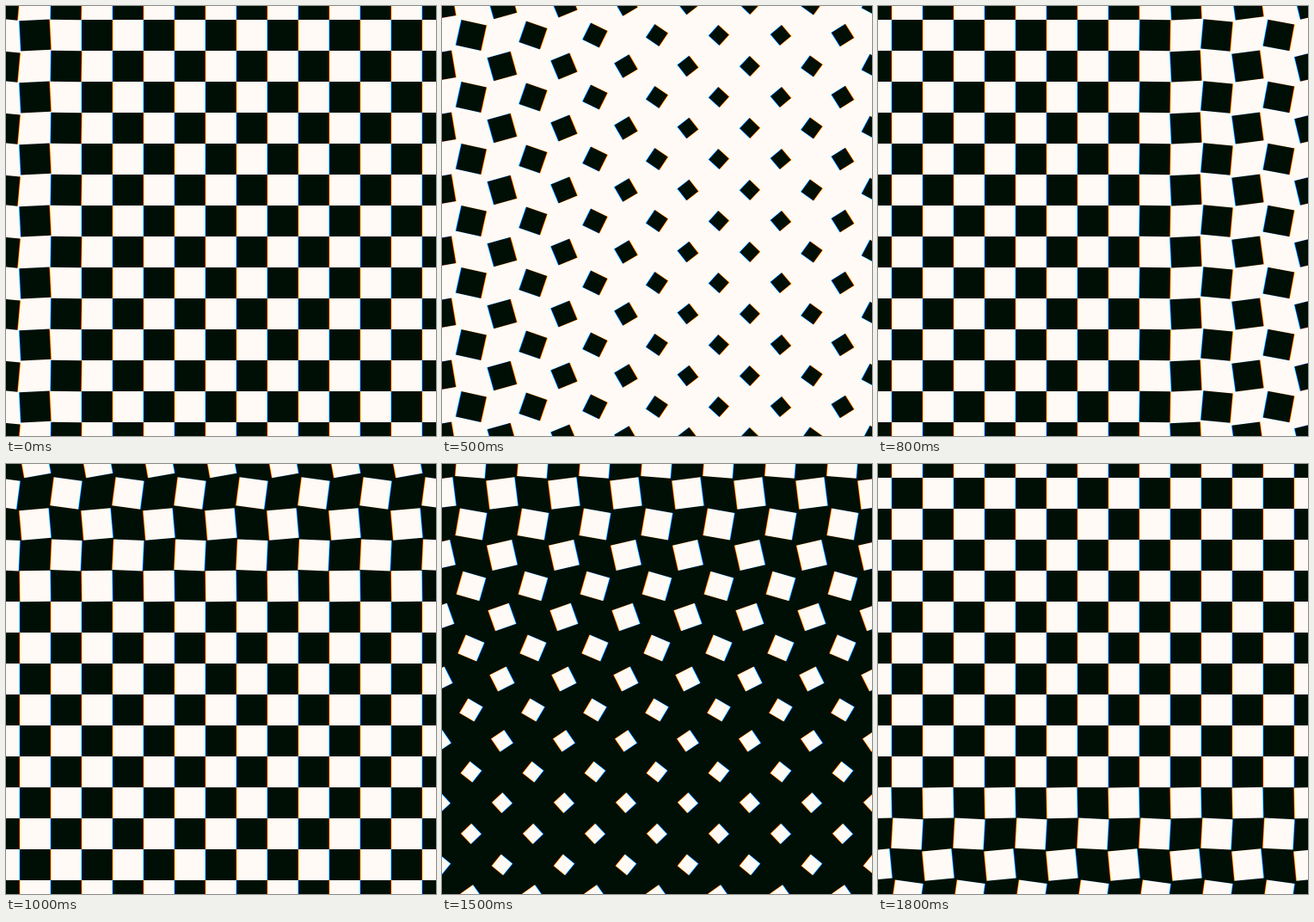
Recreate the animation shown at these times as an HTML page with a canvas. Size 500 by 500 pixels, loop 1900 ms.

```html
<!DOCTYPE html>
<html lang="en">
<head>
<meta charset="utf-8">
<title>Turning checkerboard</title>
<style>
  html, body { margin: 0; width: 100%; height: 100%; overflow: hidden; background: #fffaf5; }
  canvas { display: block; width: 500px; height: 500px; }
</style>
</head>
<body>
<canvas id="stage" width="500" height="500"></canvas>
<script>
const ctx = document.getElementById('stage').getContext('2d');

const LOOP = 1900, STEP = 100;
const CELL = 36, SMALL = 16.8, FIRST = 34;
const ACROSS_START = -59, DOWN_START = 896;
const TURN_TIME = 660, SPEED = 1.52;
const WHITE = '#fffaf5', BLACK = '#000f05';

// Each colour channel is drawn slightly offset, which tints the vertical edges.
const SHIFTS = [-0.6, 0, 0.6];
const DARKEN = ['#00ffff', '#ff0fff', '#ffff05'];
const LIGHTEN = ['#ff0000', '#00eb00', '#0000f0'];

// Progress of a cell's quarter turn; the wave reaches far cells later.
function progress(time, pos) {
  return Math.min(1, Math.max(0, (time - pos / SPEED) / TURN_TIME));
}

// Halfway between linear and smoothstep.
function ease(u) {
  return (u + u * u * (3 - 2 * u)) / 2;
}

function addSquare(path, x, y, u, dir) {
  const side = (CELL + SMALL) / 2 + (CELL - SMALL) / 2 * Math.cos(2 * Math.PI * u);
  const angle = dir * ease(u) * Math.PI / 2;
  const a = side / 2 * Math.cos(angle);
  const b = side / 2 * Math.sin(angle);
  path.moveTo(x - a + b, y - b - a);
  path.lineTo(x + a + b, y + b - a);
  path.lineTo(x + a - b, y + b + a);
  path.lineTo(x - a - b, y - b + a);
  path.closePath();
}

function buildSquares(time, down) {
  const path = new Path2D();
  for (let row = -1; row <= 13; row++) {
    for (let col = -1; col <= 13; col++) {
      const odd = (row + col) % 2 !== 0;
      if (odd !== down) continue;
      const x = FIRST + col * CELL, y = FIRST + row * CELL;
      addSquare(path, x, y, progress(time, down ? y : x), col % 2 ? 1 : -1);
    }
  }
  return path;
}

function draw(t) {
  const down = t >= DOWN_START;
  const squares = buildSquares(t - (down ? DOWN_START : ACROSS_START), down);
  const inks = down ? LIGHTEN : DARKEN;

  ctx.globalCompositeOperation = 'source-over';
  ctx.filter = 'none';
  ctx.fillStyle = down ? BLACK : WHITE;
  ctx.fillRect(0, 0, 500, 500);

  ctx.globalCompositeOperation = down ? 'lighter' : 'multiply';
  ctx.filter = 'blur(0.5px)';
  SHIFTS.forEach((dx, k) => {
    ctx.setTransform(1, 0, 0, 1, dx, 0);
    ctx.fillStyle = inks[k];
    ctx.fill(squares);
  });
  ctx.setTransform(1, 0, 0, 1, 0, 0);
}

const start = performance.now();
let shown = -1;

function tick() {
  const elapsed = Math.max(0, performance.now() - start) % LOOP;
  const t = Math.floor(elapsed / STEP) * STEP;
  if (t !== shown) draw(shown = t);
  requestAnimationFrame(tick);
}
tick();
</script>
</body>
</html>
```
